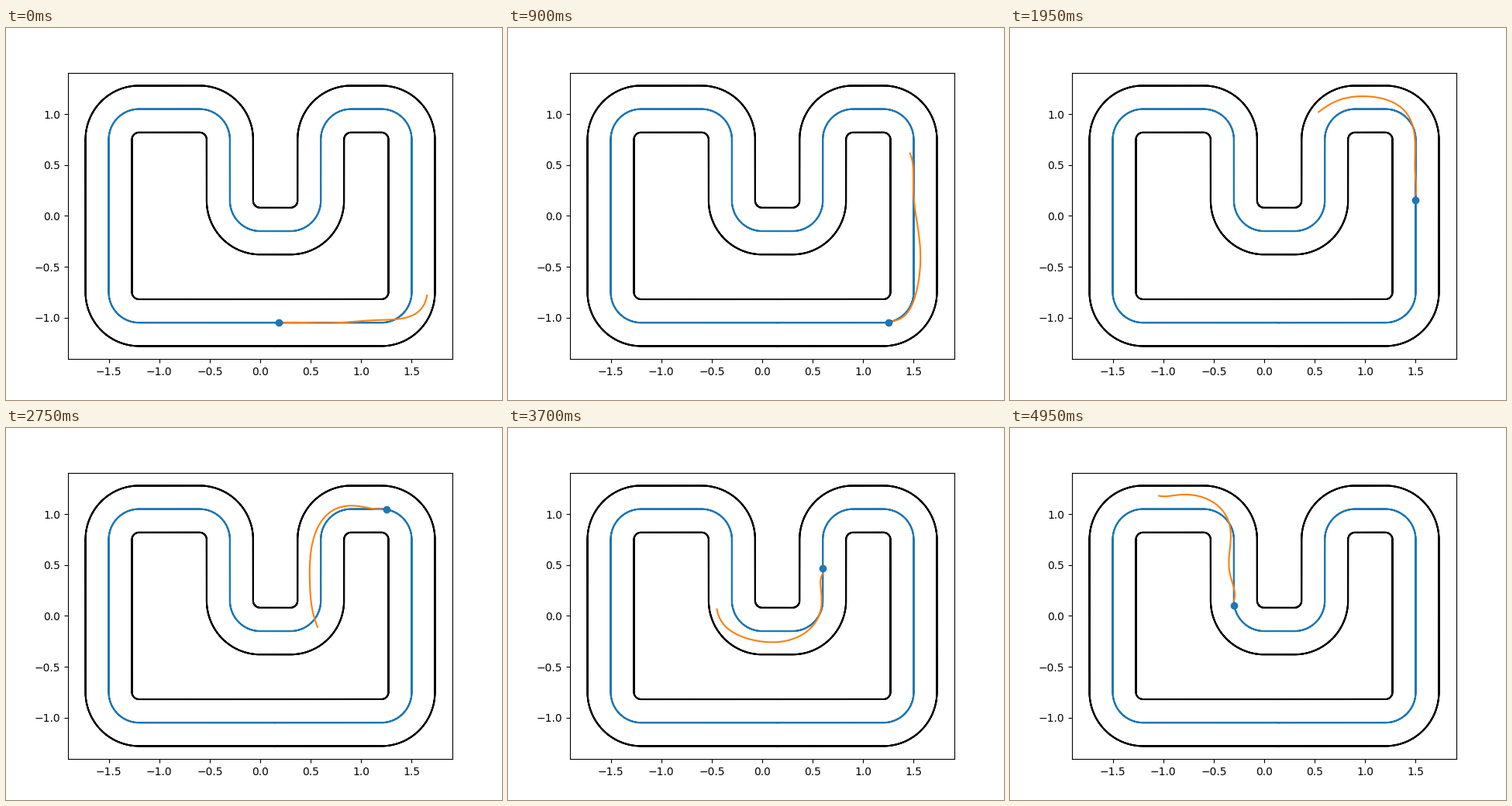
These frames come from a looping animation (640 by 480 pixels, 5 s). A matplotlib script:

```python
import numpy as np
import matplotlib.pyplot as plt
from matplotlib.animation import FuncAnimation

FRAMES, INTERVAL = 100, 50
RADIUS, HALF_WIDTH = 0.3, 0.23
XLIM, YLIM = 1.903, 1.408

# Corner centre, heading on entry in degrees, turn (+1 left, -1 right)
CORNERS = [
    (1.2, -0.75, 0, 1), (1.2, 0.75, 90, 1), (0.9, 0.75, 180, 1),
    (0.3, 0.15, 270, -1), (0.0, 0.15, 180, -1),
    (-0.6, 0.75, 90, 1), (-1.2, 0.75, 180, 1), (-1.2, -0.75, 270, 1),
]

# Frame, then distance along the centre line of the car and of the plan's end
PROGRESS = np.array([
    (0, 0.034, 1.50), (11, 0.633, 2.38), (18, 1.101, 2.886),
    (28, 1.66, 3.79), (39, 2.426, 4.07), (55, 3.441, 5.095),
    (66, 4.075, 5.40), (74, 4.546, 6.05), (90, 5.519, 7.066),
    (99, 6.055, 7.62),
])

GAP = 0.05                   # the plan begins just ahead of the car
SWING = 0.17                 # widest drift out of a corner
BEHIND, AHEAD = 0.8, 0.3     # stretches of track that shape the drift
CUT_IN = 0.4                 # pull to the inside before a corner


def track(offset=0.0, steps=200):
    """Closed line running beside the centre line, offset to its right."""
    start = (0.15, -0.75 - RADIUS - offset)
    points = [start]
    for cx, cy, heading, turn in CORNERS:
        angles = np.radians(np.linspace(heading - 90 * turn, heading, steps))
        r = RADIUS + turn * offset
        points += zip(cx + r * np.cos(angles), cy + r * np.sin(angles))
    return np.array(points + [start])


def pair_interp(x, xs, pairs):
    return np.column_stack([np.interp(x, xs, pairs[:, k]) for k in (0, 1)])


centre = track()
dist = np.concatenate([[0], np.cumsum(np.hypot(*np.diff(centre, axis=0).T))])
arc = np.linspace(0, dist[-1], 4000)
line = pair_interp(arc, dist, centre)
tangent = np.gradient(line, arc, axis=0)
normal = np.column_stack([tangent[:, 1], -tangent[:, 0]])
heading = np.unwrap(np.arctan2(tangent[:, 1], tangent[:, 0]))


def turned(start, end):
    return np.interp(end, arc, heading) - np.interp(start, arc, heading)


def plan_path(start, end):
    """Smooth path that cuts into corners and runs wide out of them."""
    u = np.linspace(0, 1, 60)
    s = start + u * (end - start)
    bend = turned(s - BEHIND, s) - CUT_IN * turned(s, s + AHEAD)
    drift = u * SWING * np.tanh(bend)
    points = pair_interp(s, arc, line) + drift[:, None] * pair_interp(s, arc, normal)
    weights = np.ones_like(u)
    weights[[0, -1]] = 10
    fit = np.polyfit(u, points, 6, w=weights)
    return np.vander(u, 7) @ fit


fig, ax = plt.subplots(figsize=(6.4, 4.8), dpi=100)
ax.set_xlim(-XLIM, XLIM)
ax.set_ylim(-YLIM, YLIM)
for offset, color in ((0, "C0"), (HALF_WIDTH, "k"), (-HALF_WIDTH, "k")):
    lap = track(offset, 40)
    ax.plot(*np.vstack([lap, lap]).T, color=color)  # two laps
plan, = ax.plot([], [], color="C1")
car, = ax.plot([], [], "o", color="C0", zorder=3)


def update(frame):
    keys, cars, ends = PROGRESS.T
    s = np.interp(frame, keys, cars)
    plan.set_data(*plan_path(s + GAP, np.interp(frame, keys, ends)).T)
    car.set_data(*pair_interp([s], arc, line).T)
    return plan, car


anim = FuncAnimation(fig, update, frames=FRAMES, interval=INTERVAL, repeat=True)
plt.show()
```
